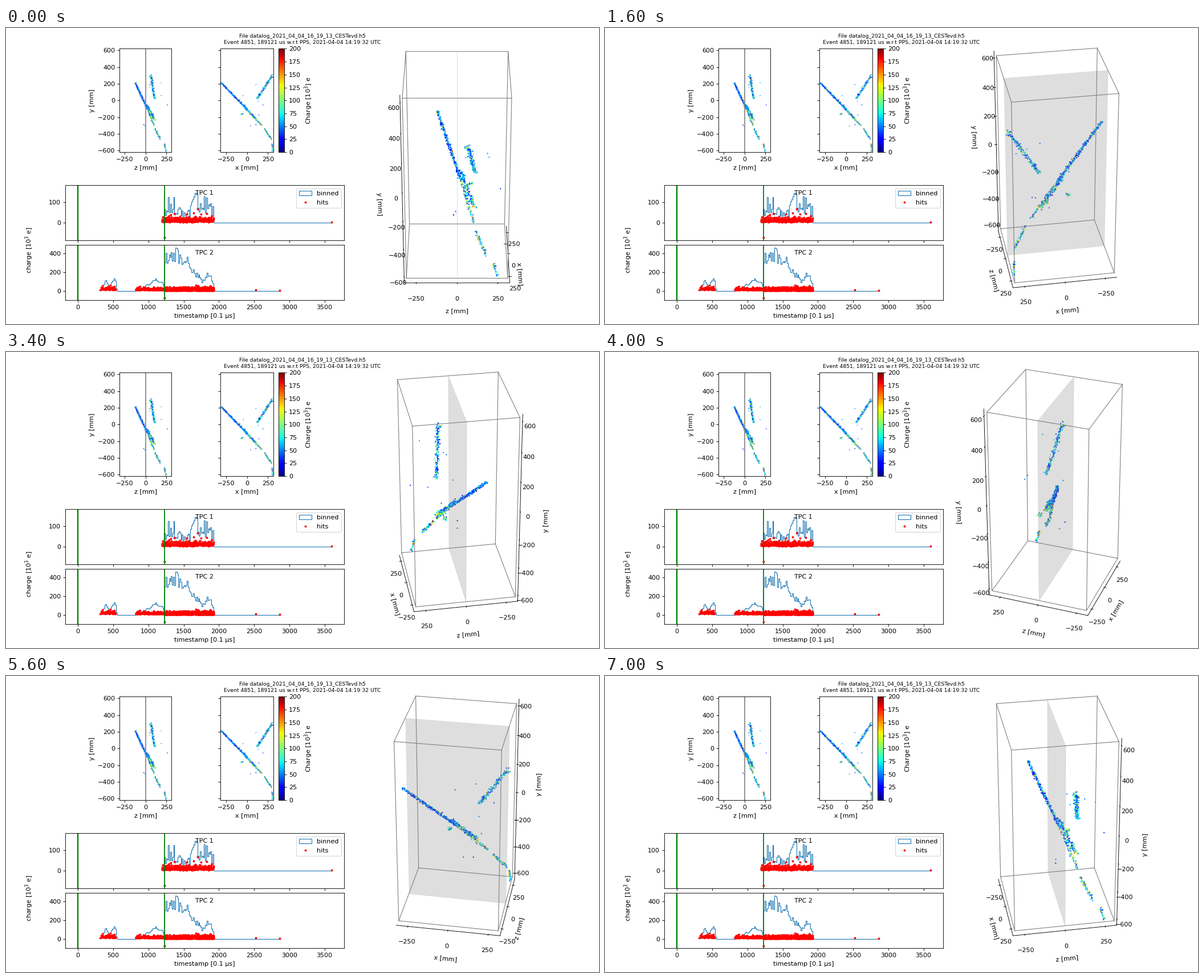
A matplotlib script for the animation above (7200 ms loop, 1040 by 520 pixels).

```python
from itertools import combinations, product

import matplotlib.pyplot as plt
import numpy as np
from matplotlib.animation import FuncAnimation
from mpl_toolkits.mplot3d.art3d import Poly3DCollection

W, H, DPI = 1040, 520, 80
FRAMES, INTERVAL = 36, 200
HALF_WIDTH, HALF_HEIGHT = 310, 620
BIN = 15
TRIGGER = 1228

plt.rcParams.update({"font.family": "DejaVu Sans", "font.size": 10})
rng = np.random.default_rng(4851)
fig = plt.figure(figsize=(W / DPI, H / DPI), dpi=DPI, facecolor="white")


def axes_px(left, top, right, bottom, **kwargs):
    rect = [left / W, 1 - bottom / H, (right - left) / W, (bottom - top) / H]
    return fig.add_axes(rect, **kwargs)


def track(n, start, end, charge, spread=4):
    """Hits (x, y, z, charge) scattered along a straight segment."""
    t = rng.random((n, 1))
    pos = np.array(start) * (1 - t) + np.array(end) * t
    pos += rng.normal(0, spread, (n, 3))
    return np.column_stack([pos, charge * rng.lognormal(0, 0.5, n)])


def make_hits():
    vertex = np.array([0, -106, 25])
    parts = [
        track(320, (-310, 215, -123), vertex, 46),
        track(100, vertex, (175, -300, 103), 72),
        track(65, (205, -340, 112), (292, -462, 178), 88),
        track(32, (300, -525, 225), (308, -610, 248), 82),
        track(190, (303, 303, 62), (120, 20, 108), 56, 6),
        track(16, (-66, -165, 78), (-50, -165, 84), 50, 6),
    ]
    # Short spurs leave the main track below the vertex.
    for k in range(5):
        start = vertex + (30 * k - 40, 46 - 32 * k, 16 * k - 10)
        parts.append(track(30, start, start + (30, -45, 32), 55 + 4 * k, 6))
    strays = rng.uniform((-60, -400, -150), (310, 310, 270), (9, 3))
    parts.append(np.column_stack([strays, rng.uniform(15, 60, 9)]))
    hits = np.vstack(parts)
    hits[:, 0] = np.clip(hits[:, 0], -HALF_WIDTH, HALF_WIDTH)
    return hits.T


def draw_projections(x, y, z, charge):
    style = dict(c=charge, cmap="jet", vmin=0, vmax=200, s=1, marker=".")
    zy = axes_px(199.2, 36.4, 290.2, 218.2)
    zy.axvline(0, color="gray", lw=1.5)
    zy.scatter(z, y, **style)
    zy.set(xlim=(-310, 310), xlabel="z [mm]", ylabel="y [mm]")
    xy = axes_px(376.2, 36.4, 469.2, 218.2)
    dots = xy.scatter(x, y, **style)
    xy.set(xlim=(-316, 316), xlabel="x [mm]")
    xy.tick_params(labelleft=False)
    for ax in (zy, xy):
        ax.set(ylim=(-HALF_HEIGHT, HALF_HEIGHT), xticks=[-250, 0, 250],
               yticks=range(-600, 601, 200))
    fig.colorbar(dots, cax=axes_px(478.2, 36.4, 488.2, 218.2),
                 ticks=range(0, 201, 25), label="Charge [$10^3$] e")


def hit_cloud(n, start, end, base, scale):
    return rng.uniform(start, end, n), base + rng.gamma(1.3, scale, n)


def draw_tpc(top, name, envelope, floor, end, clouds, outliers, ylim, yticks):
    """Binned charge follows a spiky envelope given by (time, height) points."""
    ax = axes_px(104, top, 593.2, top + 97.1)
    times, heights = np.transpose(envelope)
    starts = np.arange(times[0], times[-1], BIN)
    binned = np.interp(starts, times, heights) * rng.uniform(floor, 1, len(starts))
    ax.hist(starts, bins=np.append(starts, [starts[-1] + BIN, end]), weights=binned,
            histtype="step", color="C0", label="binned")
    t, q = np.hstack(clouds + [np.array(outliers).T])
    ax.plot(t, q, "r.", ms=5, label="hits")
    ax.axvline(0, color="g", lw=2.1)
    ax.axvline(TRIGGER, color="g", lw=1.6)
    ax.set(xlim=(-180, 3780), ylim=ylim, xticks=range(0, 3501, 500), yticks=yticks)
    fig.text(348 / W, 1 - (top + 13.8) / H, name, ha="center", va="center")
    return ax


def draw_timelines():
    tpc1 = draw_tpc(
        276.2, "TPC 1",
        [(1190, 20), (1280, 170), (1450, 75), (1560, 60), (1680, 175), (1925, 85)],
        0.3, 3600, [hit_cloud(330, 1195, 1925, 3, 7)],
        [(TRIGGER, -73), (3600, 2), (1700, 66)], (-87.5, 182), [0, 100])
    tpc1.legend(loc="upper right")
    tpc2 = draw_tpc(
        381.3, "TPC 2",
        [(316, 10), (390, 170), (430, 50), (520, 160), (545, 0), (815, 0),
         (1120, 150), (1220, 60), (1235, 450), (1370, 470), (1500, 420),
         (1620, 280), (1760, 130), (1870, 240), (1925, 30)],
        0.65, 2860,
        [hit_cloud(70, 330, 540, 14, 7), hit_cloud(160, 820, TRIGGER, 11, 7),
         hit_cloud(600, TRIGGER, 1925, 5, 9)],
        [(316, 12), (TRIGGER, -73), (2525, 11), (2860, 5)],
        (-100, 491), [0, 200, 400])
    tpc2.set_xlabel("timestamp [0.1 µs]")
    fig.text(41 / W, 1 - 390 / H, "charge [$10^3$ e]", rotation=90,
             ha="center", va="center")


def draw_volume(x, y, z, charge):
    ax = axes_px(564, 26.4, 1006, 468.4, projection="3d")
    ax.set_facecolor("none")
    size = np.array([HALF_WIDTH, HALF_WIDTH, HALF_HEIGHT])
    for a, b in combinations(product((-1, 1), repeat=3), 2):
        if np.count_nonzero(np.subtract(a, b)) == 1:
            ax.plot(*np.transpose([a * size, b * size]), color="gray", lw=1)

    shade = (0.5, 0.5, 0.5, 0.26)
    corners = [(u * HALF_WIDTH, 0, v * HALF_HEIGHT)
               for u, v in ((-1, -1), (1, -1), (1, 1), (-1, 1))]
    ax.add_collection3d(Poly3DCollection([corners], facecolors=[shade],
                                         edgecolors=[shade], linewidths=0.5))
    ax.scatter(x, z, y, c=charge, cmap="jet", vmin=0, vmax=200, s=1,
               depthshade=False)

    # Axis lines sit 1/48 of the range outside the drawn box.
    xlim, ylim, zlim = ((-s * 25 / 24, s * 25 / 24) for s in size)
    ax.set(xticks=[-250, 0, 250], yticks=[-250, 0, 250], zticks=range(-600, 601, 200),
           xlabel="x [mm]", ylabel="z [mm]")
    ax.set_zlabel("y [mm]", labelpad=20)
    ax.set(xlim=xlim, ylim=ylim, zlim=zlim)
    ax.set_box_aspect((1, 1, 2))
    ax.grid(False)
    for axis in (ax.xaxis, ax.yaxis, ax.zaxis):
        axis.set_pane_color((1, 1, 1, 0))
    return ax


fig.suptitle("File datalog_2021_04_04_16_19_13_CESTevd.h5\n"
             "Event 4851, 189121 us w.r.t PPS, 2021-04-04 14:19:32 UTC",
             fontsize="small")
hits = make_hits()
draw_projections(*hits)
draw_timelines()
volume = draw_volume(*hits)


def update(frame):
    # The tiny offset keeps the axis sides stable when looking straight on.
    volume.view_init(elev=30, azim=frame * 360 / FRAMES + 1e-3)
    return []


anim = FuncAnimation(fig, update, frames=FRAMES, interval=INTERVAL,
                     init_func=lambda: update(0), repeat=True, repeat_delay=0)
plt.show()
```
